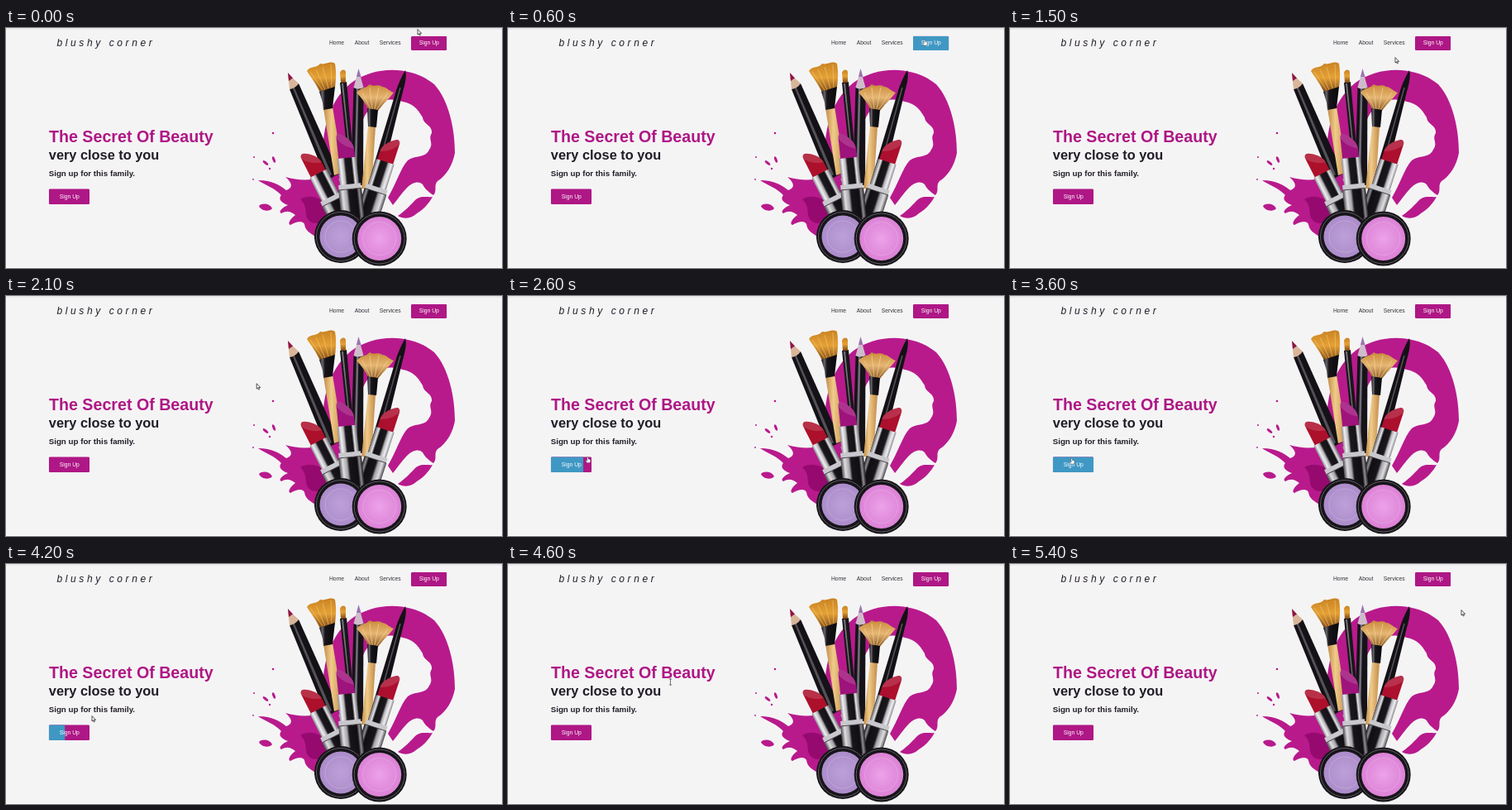
An HTML page for the animation above (5500 ms loop, 600x290 px).

```html
<!DOCTYPE html>
<html lang="en">
<head>
<meta charset="utf-8">
<title>Beauty landing page</title>
<style>
html, body { margin: 0; width: 100%; height: 100%; overflow: hidden; background: #fff; }
svg { display: block; width: 600px; height: 290px; }
text { font-family: "Liberation Sans", Arial, sans-serif; fill: #211d27; }
.nav { font-size: 6.75px; fill: #343138; }
.label { font-size: 6.75px; fill: #fff; }
.bold { font-weight: bold; }
</style>
</head>
<body>
<svg viewBox="0 0 600 290">
  <defs>
    <linearGradient id="metal">
      <stop offset="0" stop-color="#8b898e"/><stop offset=".14" stop-color="#f0f0f2"/>
      <stop offset=".3" stop-color="#b5b3b8"/><stop offset=".4" stop-color="#1b191e"/>
      <stop offset=".72" stop-color="#141216"/><stop offset=".82" stop-color="#e6e6e8"/>
      <stop offset="1" stop-color="#6a686d"/>
    </linearGradient>
    <linearGradient id="case">
      <stop offset="0" stop-color="#0b0a0d"/><stop offset=".2" stop-color="#6a676e"/>
      <stop offset=".36" stop-color="#17151a"/><stop offset="1" stop-color="#09080b"/>
    </linearGradient>
    <linearGradient id="base">
      <stop offset="0" stop-color="#4a484d"/><stop offset=".16" stop-color="#dededf"/>
      <stop offset=".34" stop-color="#a5a3a8"/><stop offset=".44" stop-color="#17151a"/>
      <stop offset=".78" stop-color="#100e12"/><stop offset=".88" stop-color="#8f8d92"/>
      <stop offset="1" stop-color="#1b191e"/>
    </linearGradient>
    <linearGradient id="wood">
      <stop offset="0" stop-color="#c08a48"/><stop offset=".4" stop-color="#f0cb8a"/>
      <stop offset="1" stop-color="#c28a48"/>
    </linearGradient>
    <linearGradient id="hair" x2="0" y2="1">
      <stop offset="0" stop-color="#c98322"/><stop offset=".5" stop-color="#e5a136"/>
      <stop offset="1" stop-color="#7d4814"/>
    </linearGradient>
    <linearGradient id="fan" x2="0" y2="1">
      <stop offset="0" stop-color="#c98a3a"/><stop offset=".5" stop-color="#e6b673"/>
      <stop offset="1" stop-color="#8d5a24"/>
    </linearGradient>
    <radialGradient id="lilac"><stop offset="0" stop-color="#bda0d8"/><stop offset="1" stop-color="#ab8cca"/></radialGradient>
    <radialGradient id="pink"><stop offset="0" stop-color="#eca2e8"/><stop offset="1" stop-color="#dc82d6"/></radialGradient>
    <g id="stick">
      <rect x="-14" y="68" width="28" height="36" fill="url(#base)"/>
      <rect x="-11.5" y="30" width="23" height="33" fill="url(#metal)"/>
      <rect x="-13.5" y="62" width="27" height="6" fill="#c9c8cc"/>
      <path d="M-13.5 68h27" stroke="#3a383d" stroke-width=".8"/>
    </g>
    <path id="bullet" d="M-10 31V5C-10 1-7-1-4 1C3 5 10 12 10 20V31Z"/>
    <path id="shine" d="M-10 5C-10 1-7-1-4 1C3 5 10 12 10 20C3 18-6 13-10 5Z" fill="#fff" opacity=".14"/>
  </defs>

  <rect width="600" height="289" fill="#f5f4f5"/>
  <path d="M0 1h600" stroke="#dddcde" stroke-width="1"/>

  <text x="61.5" y="22" font-size="12" font-style="italic" letter-spacing="3.6">blushy corner</text>
  <text class="nav" x="391" y="20.3">Home</text>
  <text class="nav" x="421.7" y="20.3">About</text>
  <text class="nav" x="451.7" y="20.3">Services</text>
  <text class="bold" x="52" y="138" font-size="19.65" style="fill:#ae1785">The Secret Of Beauty</text>
  <text class="bold" x="51.8" y="158.6" font-size="16.35">very close to you</text>
  <text class="bold" x="51.7" y="178.6" font-size="9.75">Sign up for this family.</text>
  <g id="buttons"></g>

  <g fill="#b81a8c">
    <path d="M386 175C378 130 390 88 418 66C448 45 491 46 518 68C536 88 543 122 543 151C540 166 533 178 522 185C517 190 522 196 517 202C512 199 507 195 504 189C499 184 491 187 485 193C478 200 473 208 468 214L462 205C472 188 477 170 486 160C494 153 507 158 512 147C518 138 510 135 515 127C516 117 505 117 504 108C498 98 492 91 480 89C460 81 438 92 431 113L420 190Z"/>
    <path d="M516 204C511 213 504 220 497 224C490 231 481 231 474 227C484 220 490 213 496 207C503 202 510 205 516 204Z"/>
    <path d="M395 165C385 186 360 186 338 180C346 187 348 193 339 196C331 190 322 184 305 184C314 190 326 194 333 202C328 208 336 212 341 214C334 217 329 222 333 224C340 220 345 222 350 226C342 232 341 237 344 238C352 234 358 232 361 237C362 245 368 248 376 253L425 235Z"/>
    <path d="M306 215C310 211 319 212 322 218C319 222 309 222 306 215Z"/>
    <ellipse cx="324" cy="159" rx="1.6" ry="4" transform="rotate(-20 324 159)"/>
    <ellipse cx="314" cy="163" rx="4" ry="1.6" transform="rotate(38 314 163)"/>
    <circle cx="323" cy="127" r="1.3"/><circle cx="300" cy="156" r="1"/>
    <circle cx="319" cy="170" r="1.2"/><circle cx="299" cy="183" r=".9"/>
  </g>
  <path d="M356 207C366 201 378 204 388 212L386 238C378 233 372 239 366 232C360 226 366 216 356 207Z" fill="#960a70"/>

  <path d="M343 74L354 67L403 176L388 184Z" fill="#141216"/>
  <path d="M346.5 72L348.5 71L394 177L391 179Z" fill="#555158"/>
  <path d="M341 55L354 67Q350 73 343 74Z" fill="#d9b59a"/>
  <path d="M341 54L347 60.5L342 64Z" fill="#8f1746"/>

  <path d="M384 97L395 95L408 174L397 178Z" fill="url(#wood)"/>
  <path d="M364 52C368 45 376 49 380 43C387 45 391 39 398 43C400 55 399 64 398 72L380 78C375 67 369 60 364 52Z" fill="url(#hair)"/>
  <path d="M368 53L383 75M375 50L386 75M383 47L390 73M393 44L394 72" stroke="#f3c069" stroke-width=".7" fill="none"/>
  <path d="M379 77L398 71L396 88L395 97L384 99L383 90Z" fill="url(#case)"/>

  <path d="M404 66L412 65L419 142L412 144Z" fill="#19171b"/>
  <path d="M406 67L408 67L415 138L414 139Z" fill="#77737a"/>
  <path d="M404 54C405 50 410 49 411 53L411 66H405Z" fill="url(#hair)"/>

  <path d="M420.5 72L432.5 72L432 190H417Z" fill="#151318"/>
  <path d="M424 72H426.5L424 190H421Z" fill="#716b78"/>
  <path d="M426.5 50L432.5 72Q426 75 420.5 72Z" fill="#cfbccb"/>
  <path d="M426.5 49L429.5 59H424Z" fill="#9a74b0"/>

  <path d="M438 118L447 119L442 196L430 194Z" fill="url(#wood)"/>
  <path d="M424 78C431 70 435 74 440 68C445 72 449 67 455 71C460 71 463 76 469 78C462 87 455 93 450 100L438 98C435 91 430 84 424 78Z" fill="url(#fan)"/>
  <path d="M431 78L441 98M440 72L443 98M451 72L446 98M462 78L448 99" stroke="#f3d19a" stroke-width=".7"/>
  <path d="M437 97L450 99L448 120L438 119Z" fill="url(#case)"/>

  <path d="M483 51C485 57 483 67 480 77L450 199L436 195L471 79C474 68 479 58 483 51Z" fill="#131115"/>
  <path d="M477 72L446 183" stroke="#57535a" stroke-width="1.5"/>

  <g transform="translate(364 149) rotate(-27)">
    <use href="#bullet" fill="#ad102b"/><use href="#shine"/><use href="#stick"/>
  </g>
  <g transform="translate(468 133) rotate(18) scale(-1 1)">
    <use href="#bullet" fill="#ad0f2e"/><use href="#shine"/><use href="#stick"/>
  </g>
  <g transform="translate(409 127) rotate(-6)">
    <use href="#bullet" fill="#9f137c"/><use href="#shine"/><use href="#stick"/>
  </g>

  <g id="pans"></g>
  <g id="cursor" stroke-linejoin="round" stroke-linecap="round">
    <path id="arrow" d="M0 0V6L1.4 4.8L2.4 7L3.4 6.5L2.4 4.4H4.2Z" fill="#fff" stroke="#29272d" stroke-width=".8"/>
    <path id="hand" d="M-.8 0H.5V2.4L3.2 3V5.4L2.4 7H-1L-2.6 4.6L-2 4L-.8 4.7Z" fill="#fff" stroke="#3a3840" stroke-width=".4"/>
    <path id="beam" d="M-1.3-3.5H1.3M0-3.5V3.5M-1.3 3.5H1.3" fill="none" stroke="#55525a" stroke-width=".8"/>
  </g>
</svg>
<script>
const LOOP = 5500, STEP = 100, SWEEP = 300;
const $ = id => document.getElementById(id);

// Hover intervals drive the left-to-right colour fill.
const buttons = [
  { x: 490, y: 9.7, w: 43.3, h: 17.3, tx: 499.8, ty: 20.3, on: 150, off: 1100 },
  { x: 51.8, y: 194.3, w: 49.3, h: 18.8, tx: 64.8, ty: 206.2, on: 2450, off: 4100 }
];
$('buttons').innerHTML = buttons.map(({ x, y, w, h, tx, ty }, i) => {
  const box = `x="${x}" y="${y}" height="${h}"`;
  return `<clipPath id="c${i}"><rect ${box} width="${w}" rx="1.5"/></clipPath>
    <g clip-path="url(#c${i})"><rect ${box} width="${w}" fill="#ae1785"/>
    <rect id="fill${i}" ${box} width="0" fill="#3f98c4"/></g>
    <text class="label" x="${tx}" y="${ty}">Sign Up</text>`;
}).join('');

const ring = (x, y, r, fill, extra = '') =>
  `<circle cx="${x}" cy="${y}" r="${r}" fill="${fill}" ${extra}/>`;
const pan = (x, y, r, tone) =>
  ring(x, y, r, '#171519') +
  ring(x, y, r - 2.5, 'none', 'stroke="#5d5961" stroke-width="1"') +
  ring(x, y, r - 6.5, `url(#${tone})`) +
  ring(x, y, r - 13, 'none', 'stroke="#fff" stroke-opacity=".18"');
$('pans').innerHTML = pan(405, 252, 32, 'lilac') + pan(451.7, 254.5, 33, 'pink');

const path = [
  [0, 498, 2], [300, 504, 14], [1000, 504, 14], [1200, 496, 30], [1500, 466, 36],
  [1900, 400, 66], [2400, 125, 180], [2600, 96.5, 194.5], [3100, 74.5, 196],
  [4000, 75, 196], [4200, 104, 184], [4600, 196.5, 142.5], [4800, 200, 141],
  [5400, 546, 56], [5500, 546, 56]
];
const shapes = [
  [0, 'arrow'], [200, 'hand'], [1100, 'arrow'], [2500, 'hand'],
  [4100, 'arrow'], [4500, 'beam'], [4900, 'arrow']
];

const clamp = v => Math.min(1, Math.max(0, v));
const smooth = v => v * v * (3 - 2 * v);
const easeOut = v => 1 - (1 - v) ** 2.3;

function position(t) {
  const i = path.findIndex(p => p[0] > t);
  const [a, x, y] = path[i - 1], [b, u, v] = path[i];
  const k = smooth((t - a) / (b - a));
  return [x + (u - x) * k, y + (v - y) * k];
}

function draw(t) {
  buttons.forEach(({ w, on, off }, i) => {
    const p = easeOut(clamp((t - on) / SWEEP)) - easeOut(clamp((t - off) / SWEEP));
    $('fill' + i).setAttribute('width', w * p);
  });
  $('cursor').setAttribute('transform', `translate(${position(t)})`);
  const shape = shapes.filter(s => s[0] <= t).pop()[1];
  for (const id of ['arrow', 'hand', 'beam'])
    $(id).style.display = id === shape ? '' : 'none';
}

const start = performance.now();
function tick() {
  const t = (performance.now() - start) % LOOP;
  draw(Math.floor(t / STEP) * STEP);
  requestAnimationFrame(tick);
}
tick();
</script>
</body>
</html>
```
